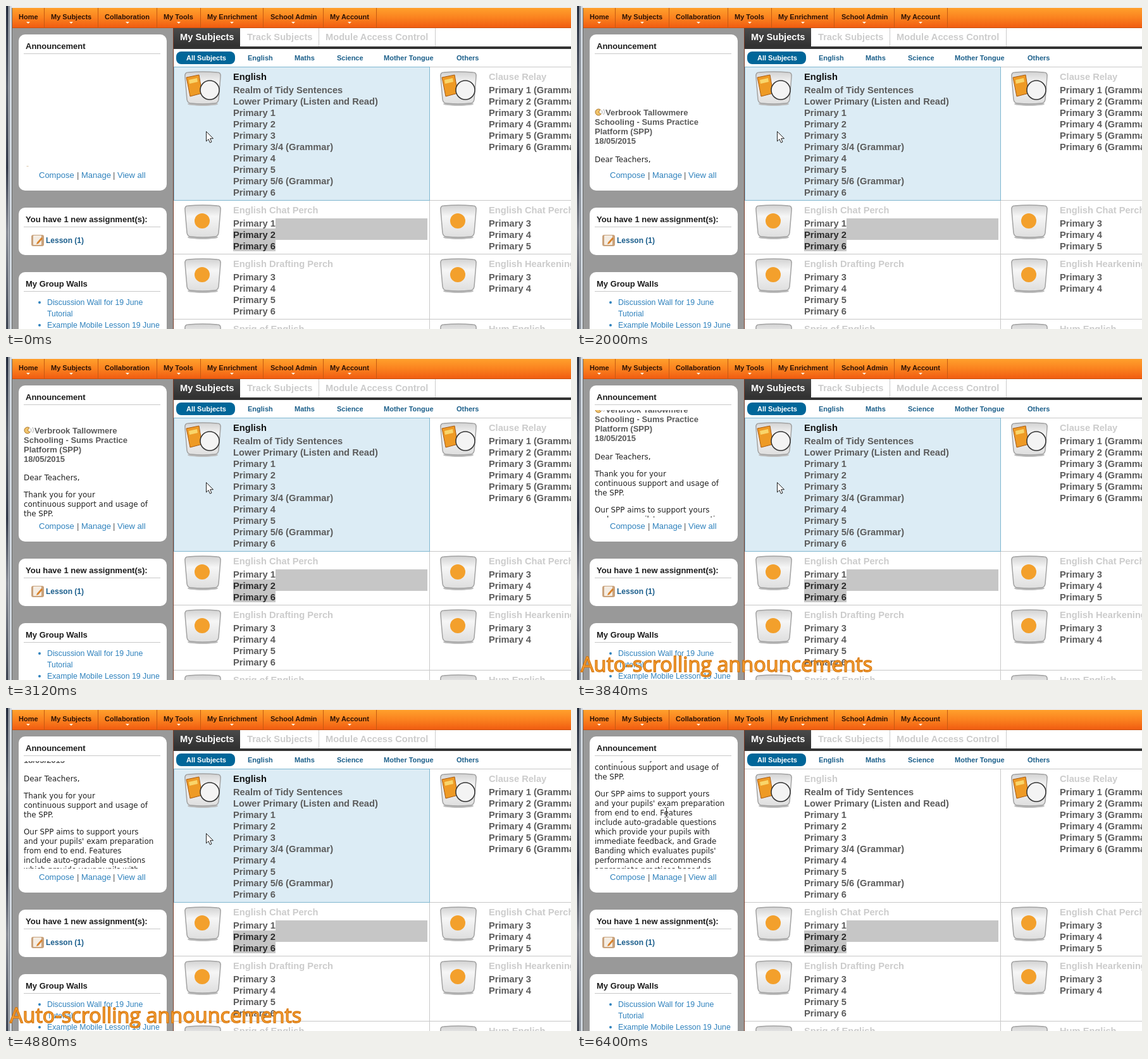
Recreate the animation shown at these times as an HTML page. Size 893x511 px, loop 8 s.

```html
<!DOCTYPE html>
<html lang="en">
<head>
<meta charset="utf-8">
<title>Announcements</title>
<style>
html, body { margin: 0; width: 100%; height: 100%; overflow: hidden; background: #fff; }
svg { display: block; width: 893px; height: 511px; font-family: "Liberation Sans", Arial, sans-serif; }
.b { font-weight: bold; }
.body { font-family: "DejaVu Sans", Verdana, sans-serif; font-size: 11.9px; fill: #222; }
.caption { font: 32.4px "Open Sans", sans-serif; fill: #ffab40; stroke: #d9790f; stroke-width: 1.5px; }
</style>
</head>
<body>
<svg id="stage" viewBox="0 0 893 511">
  <defs>
    <linearGradient id="nav" x2="0" y2="1">
      <stop offset="0" stop-color="#ffa02c"/><stop offset=".45" stop-color="#fb8420"/>
      <stop offset="1" stop-color="#f05a10"/>
    </linearGradient>
    <linearGradient id="tab" x2="0" y2="1">
      <stop offset="0" stop-color="#4a4a4a"/><stop offset="1" stop-color="#303030"/>
    </linearGradient>
    <linearGradient id="silver" x2="0" y2="1">
      <stop offset="0" stop-color="#d2d2d2"/><stop offset=".35" stop-color="#f6f6f6"/>
      <stop offset="1" stop-color="#dedede"/>
    </linearGradient>
    <linearGradient id="photo" x2="0" y2="1">
      <stop offset="0" stop-color="#2c3444"/><stop offset=".25" stop-color="#5d6470"/>
      <stop offset=".5" stop-color="#39404f"/><stop offset=".7" stop-color="#8b8f98"/>
      <stop offset="1" stop-color="#444b58"/>
    </linearGradient>
    <clipPath id="window"><rect x="26" y="84" width="220" height="170"/></clipPath>
  </defs>
</svg>
<script>
const stage = document.getElementById("stage");

function add(tag, attrs, parent = stage) {
  const el = document.createElementNS("http://www.w3.org/2000/svg", tag);
  for (const key in attrs) el.setAttribute(key, attrs[key]);
  return parent.appendChild(el);
}
const rect = (x, y, width, height, fill, rx = 0, parent) =>
  add("rect", { x, y, width, height, fill, rx }, parent);
const path = (d, fill, extra, parent) => add("path", { d, fill, ...extra }, parent);
const label = (x, y, str, size, fill, cls = "b", parent) => {
  const el = add("text", { x, y, "font-size": size, fill, class: cls }, parent);
  el.textContent = str;
  return el;
};

// Window edge and navigation bar
rect(0, 0, 893, 4, "#eeeeee");
rect(0, 0, 4, 511, "url(#photo)");
rect(4, 0, 1, 511, "#dfe3e8");
rect(5, 0, 1, 511, "#59616c");
rect(6, 0, 3, 511, "#d5dce4");
rect(9, 3, 1, 508, "#666");
rect(10, 3, 883, 32, "url(#nav)");
rect(10, 34, 883, 1, "#c9510f");

const menu = [["Home", 20, 35, 60], ["My Subjects", 71, 103, 145], ["Collaboration", 156, 192, 238],
  ["My Tools", 249, 273, 307], ["My Enrichment", 318, 357, 406], ["School Admin", 418, 454, 501],
  ["My Account", 512, 543, 585]];
for (const [str, x, mid, edge] of menu) {
  label(x, 21, str, 11, "#2a1204");
  path(`M${mid - 3} 25h6l-3 3z`, "#fff3e0");
  rect(edge, 3, 1, 31, "#c65a12");
}

// Sidebar
rect(10, 35, 254, 476, "#999");
rect(264, 35, 1, 476, "#7a3a25");
for (const [y, h, title, base, rule] of [
  [45, 247, "Announcement", 68, 75],
  [319, 75, "You have 1 new assignment(s):", 342, 349],
  [421, 110, "My Group Walls", 444, 451]]) {
  rect(20, y, 234, h, "#fff", 10);
  label(31, base, title, 13, "#1c1c1c");
  rect(28, rule, 216, 1, "#c8c8c8");
}
const link = "#2f82bd";
for (const [x, str] of [[52, "Compose"], [119, "Manage"], [176, "View all"]]) label(x, 272, str, 13, link, "");
for (const x of [112, 169]) label(x, 272, "|", 13, "#555", "");

rect(40, 362, 20, 18, "#c9a27c", 3);
rect(43, 363, 13, 15, "#f4ece2", 1);
path("M49 374l7-8 2 2-7 8-3 1z", "#d9822b");
label(63, 375, "Lesson (1)", 12, "#1b5e8c");

for (const [y, str] of [[473, "Discussion Wall for 19 June"], [491, "Tutorial"],
  [509, "Example Mobile Lesson 19 June"]]) label(65, y, str, 12.3, link, "");
for (const cy of [469, 505]) add("circle", { cx: 53, cy, r: 2, fill: link });

// Scrolling announcement, laid out from the first baseline
const view = add("g", { "clip-path": "url(#window)" });
const news = add("g", {}, view);
path("M37 -9A5 5 0 1 0 38 -2L34 -5z", "#f2c46a", { stroke: "#a8742a", "stroke-width": 1 }, news);
path("M39 -8q2 3 0 6M42 -10q3 5 0 9", "none", { stroke: "#aaa" }, news);
[[45, "Verbrook Tallowmere"], [28, "Schooling - Sums Practice"], [28, "Platform (SPP)"], [28, "18/05/2015"]]
  .forEach(([x, str], i) => label(x, i * 15, str, 13, "#5a5a5a", "b", news));
const paragraphs = [
  [74, "Dear Teachers,"],
  [101, "Thank you for your", "continuous support and usage of", "the SPP."],
  [158, "Our SPP aims to support yours", "and your pupils' exam preparation", "from end to end. Features",
    "include auto-gradable questions", "which provide your pupils with", "immediate feedback, and Grade",
    "Banding which evaluates pupils'", "performance and recommends", "appropriate practices based on"]];
for (const [top, ...lines] of paragraphs)
  lines.forEach((str, i) => label(28, top + i * 15, str, 11.9, "#222", "body", news));

// Tabs and filters
rect(265, 35, 628, 476, "#fff");
rect(265, 35, 105, 30, "url(#tab)");
rect(265, 64, 628, 4, "#333");
rect(494, 35, 1, 29, "#ccc");
rect(678, 35, 1, 29, "#ccc");
const pt11 = 14.667;
label(275, 54, "My Subjects", pt11, "#fff");
label(381, 54, "Track Subjects", pt11, "#ccc");
label(505, 54, "Module Access Control", pt11, "#ccc");
rect(269, 72, 93, 20, "#069", 8);
label(285, 86, "All Subjects", 11, "#fff");
for (const [x, str] of [[382, "English"], [456, "Maths"], [523, "Science"], [597, "Mother Tongue"], [712, "Others"]])
  label(x, 86, str, 11, "#1b5f8a");

// Subject grid
for (const y of [96, 307, 392, 495]) rect(265, y, 628, 1, "#c8c8c8");
rect(669, 96, 1, 415, "#c8c8c8");
const hot = rect(265.5, 96.5, 404, 211, "#dcecf5");
hot.setAttribute("stroke", "#7fb7d0");
rect(426, 336, 240, 34, "#c6c6c6");
rect(359, 352, 67, 36, "#c6c6c6");

function tile(x, y, book) {
  const g = add("g", { transform: `translate(${x} ${y})` });
  add("ellipse", { cx: 29, cy: 51, rx: 24, ry: 3, fill: "#bbb" }, g);
  path("M6 1Q29-1 52 1Q58 1 57 8L54 44Q53 50 47 50Q29 52 11 50Q5 50 4 44L1 8Q0 1 6 1z",
    "url(#silver)", { stroke: "#a2a2a2", "stroke-width": 1.5 }, g);
  if (book) {
    path("M3 9L23 5L28 34L9 39z", "#ee9a25", { stroke: "#a85a12" }, g);
    path("M7 13L20 10L21 16L8 19z", "#f9d56a", {}, g);
    add("circle", { cx: 40, cy: 29, r: 15, fill: "#f4f4f4", stroke: "#333", "stroke-width": 1.5 }, g);
  } else {
    add("circle", { cx: 28, cy: 25, r: 12, fill: "#f3a02c" }, g);
  }
}

const primary = (...ids) => ids.map(id => "Primary " + id);
const cells = [
  [0, 117, "English", ["Realm of Tidy Sentences", "Lower Primary (Listen and Read)",
    ...primary(1, 2, 3, "3/4 (Grammar)", 4, 5, "5/6 (Grammar)", 6)]],
  [404, 117, "Clause Relay", primary(1, 2, 3, 4, 5, 6).map(s => s + " (Grammar)")],
  [0, 328, "English Chat Perch", primary(1, 2, 6)],
  [404, 328, "English Chat Perch", primary(3, 4, 5)],
  [0, 413, "English Drafting Perch", primary(3, 4, 5, 6)],
  [404, 413, "English Hearkening Perch", primary(3, 4)],
  [0, 516, "Sprig of English", []],
  [404, 516, "Hum English", []]];
const heads = cells.map(([dx, y, title, items]) => {
  tile(282 + dx, y - 13, y === 117);
  items.forEach((str, i) => {
    const picked = dx === 0 && y === 328 && i > 0;
    label(359 + dx, y + 21 + i * 18, str, pt11, picked ? "#2c2c2c" : "#5c5c5c");
  });
  return label(359 + dx, y, title, pt11, "#ccc");
});

const caption = label(6, 498, "Auto-scrolling announcements", 32.4, "#ffab40", "caption");

const arrow = path("M.5 .5V16L4 12.7L6.4 18.2L9 17L6.6 11.7H11.5z", "#fff", { stroke: "#222" });
const beam = path("M-3 -7.5H-1L0 -6.5L1 -7.5H3M0 -6.5V6.5M-3 7.5H-1L0 6.5L1 7.5H3", "none", { stroke: "#222" });

// Motion: [time, value...]
const LOOP = 8000, STEP = 80;
const scroll = [[0, 264], [2000, 173], [3120, 121], [3840, 88], [4880, 42], [5520, 12], [6160, -18]];
const pointer = [[5920, 316, 198], [6080, 278, 185], [6160, 250, 174], [6240, 190, 168], [6320, 153, 165], [6400, 141, 165]];

function at(keys, t, i = 1) {
  const n = keys.findIndex(k => k[0] > t);
  if (n === 0) return keys[0][i];
  if (n < 0) return keys[keys.length - 1][i];
  const a = keys[n - 1], b = keys[n];
  return Math.round(a[i] + (b[i] - a[i]) * (t - a[0]) / (b[0] - a[0]));
}
const show = (el, on) => el.setAttribute("visibility", on ? "visible" : "hidden");
const move = (el, x, y) => el.setAttribute("transform", `translate(${x} ${y})`);

function draw(now) {
  const t = Math.floor((now % LOOP) / STEP) * STEP;
  move(news, 0, at(scroll, t));
  const x = at(pointer, t), y = at(pointer, t, 2);
  const overText = x < 231, overCell = x > 265;
  move(arrow, x, y);
  move(beam, x + .5, y);
  show(arrow, !overText);
  show(beam, overText);
  show(hot, overCell);
  heads[0].setAttribute("fill", overCell ? "#111" : "#ccc");
  show(caption, t >= 3360 && t < 5920);
}

const start = performance.now();
function tick() {
  draw(performance.now() - start);
  requestAnimationFrame(tick);
}
tick();
</script>
</body>
</html>
```
